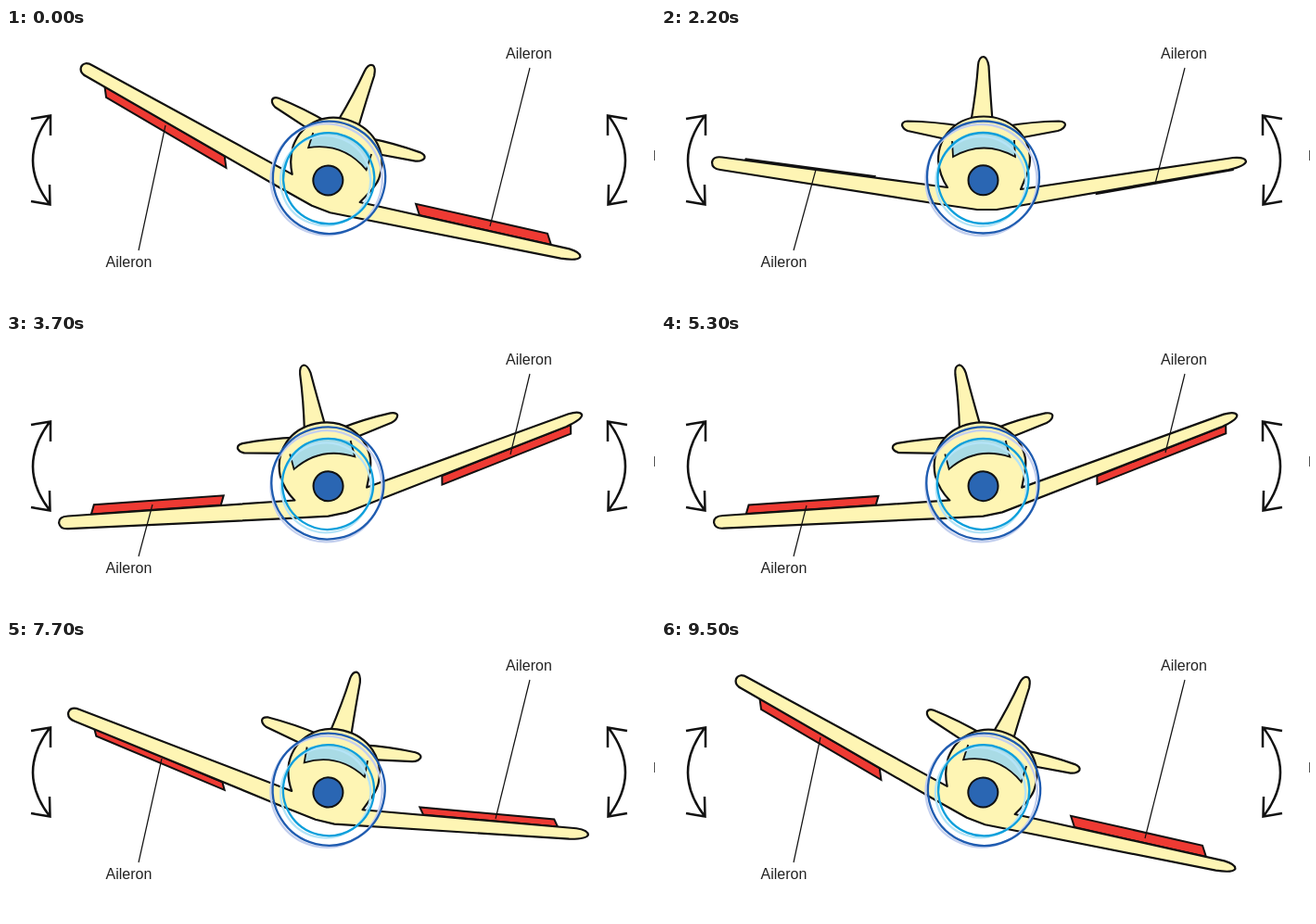
Recreate the animation shown at these times as an HTML page. Size 700 px wide and 300 px high, loop 9700 ms.

```html
<!DOCTYPE html>
<html lang="en">
<head>
<meta charset="utf-8">
<title>Ailerons and roll</title>
<style>
  html, body { margin: 0; width: 100%; height: 100%; overflow: hidden; background: #fff; }
  svg { display: block; width: 700px; height: 300px; }
  text { font: 16px Arial, "Liberation Sans", sans-serif; fill: #222; }
  .body { fill: #fef5b4; stroke: #111; stroke-width: 2.2; stroke-linejoin: round; }
  .flap { fill: #ee3a33; stroke: #111; stroke-width: 2; }
  .line { fill: none; stroke: #111; stroke-width: 1.2; }
  .arrow { fill: none; stroke: #111; stroke-width: 2.5; }
  .ring { fill: none; stroke-width: 2.3; }
</style>
</head>
<body>
<svg viewBox="0 0 700 300">
  <defs>
    <path id="arrow" class="arrow" d="M47 95Q11 143 47 190M27 98L48 94.5L48 116M27 187L47.5 190.5L47 169"/>
  </defs>
  <use href="#arrow"/>
  <use href="#arrow" transform="translate(697 0) scale(-1 1)"/>
  <rect x="699" y="132" width="1" height="11" fill="#555"/>

  <g id="plane">
    <path class="body" d="M334.5 100Q340 68 342 40Q343 31 348 31Q352 32 353.5 41Q355 68 357.5 100Z"/>
    <path class="body" d="M325 106Q295 101 266 100.5Q260 101 260 105Q261 109 266 111L312 121Z"/>
    <path class="body" d="M372 106Q400 101 429 100.5Q436 101 436 104.5Q435 109 428 111L380 120Z"/>
    <polygon id="flapL" class="flap"/>
    <polygon id="flapR" class="flap"/>
    <path class="body" d="M309 172L66 139.5Q56 138 55 145Q55 152 64 153L300 190L341 196H362L612 153Q630 149 631 144Q630 139 617 140L388 174C394 160 398 151 398 143C398 115 376 95.5 348 95.5C320 95.5 299 115 299 143C300 155 303 163 309 172Z"/>
    <path d="M314 123Q347 102 381 122L382 139Q348 120 315 139Z" fill="#a9dbe5"/>
    <path d="M314 122L315 139Q348 120 382 139L381 121" fill="none" stroke="#111" stroke-width="1.8"/>
    <circle class="ring" cx="345.5" cy="164" r="60" stroke="#c3cfee"/>
    <circle class="ring" cx="345" cy="165.5" r="48.5" stroke="#b5e4f7" stroke-width="3"/>
    <circle class="ring" cx="347.5" cy="161" r="60.5" stroke="#1f5cb0"/>
    <circle class="ring" cx="347.5" cy="162" r="49" stroke="#0d9fdb"/>
    <circle cx="347.5" cy="164.3" r="16" fill="#2a66b3" stroke="#111" stroke-width="2"/>
  </g>

  <line id="leadL" class="line" x1="143" y1="240"/>
  <line id="leadR" class="line" x1="565" y1="43"/>
  <text x="107.5" y="258">Aileron</text>
  <text x="539" y="33">Aileron</text>
</svg>
<script>
const LOOP = 9700, STEP = 100;
// time, roll in degrees, aileron deflection, left pointer x y, right pointer x y
const KEYS = [
  [0, 21, 1, 172, 105, 522, 214],
  [2200, 0, -0.1, 167, 153, 533, 168],
  [3700, -11.6, -0.9, 158, 184, 544, 130],
  [4500, -13.5, -1, 157, 190, 545, 124],
  [4600, -13.5, -1, 157, 190, 545, 124],
  [5300, -11.5, -0.83, 157, 185, 544, 128],
  [6600, 0.1, 0, 163, 154, 535, 166],
  [7700, 13.4, 0.7, 168, 128, 528, 193],
  [9500, 21, 1, 172, 105, 522, 214]
];
const $ = id => document.getElementById(id);

function secant(i, c) {
  const a = KEYS[i], b = KEYS[i + 1];
  return a && b ? (b[c] - a[c]) / (b[0] - a[0]) : 0;
}

function slope(i, c) {
  const p = secant(i - 1, c), q = secant(i, c);
  return p * q > 0 ? 2 * p * q / (p + q) : 0;
}

// Monotone cubic through the keys
function valueAt(t, c) {
  const last = KEYS.length - 1;
  if (t >= KEYS[last][0]) return KEYS[last][c];
  const i = KEYS.findIndex(k => k[0] > t) - 1;
  const a = KEYS[i], b = KEYS[i + 1], h = b[0] - a[0], u = (t - a[0]) / h, v = 1 - u;
  return a[c] * v * v * (1 + 2 * u) + b[c] * u * u * (1 + 2 * v)
    + h * u * v * (slope(i, c) * v - slope(i + 1, c) * u);
}

function setFlap(id, [x1, y1, x2, y2], dx, dy, amount) {
  const el = $(id), x = dx * amount, y = dy * amount;
  el.setAttribute("points", [x1, y1, x2, y2, x2 + x, y2 + y, x1 + x, y1 + y].join(" "));
  el.style.display = amount < 0.04 ? "none" : "";
}

function setLead(id, x, y) {
  $(id).setAttribute("x2", x);
  $(id).setAttribute("y2", y);
}

function draw(t) {
  const [roll, flap, lx, ly, rx, ry] = [1, 2, 3, 4, 5, 6].map(c => valueAt(t, c));
  $("plane").setAttribute("transform", `rotate(${roll} 347 164)`);
  if (flap > 0) {
    setFlap("flapL", [86, 155.5, 234, 180], 6, 11, flap);
    setFlap("flapR", [453, 164, 597, 143], -8, -10, flap);
  } else {
    setFlap("flapL", [91, 142.5, 230, 161], 5.5, -10.5, -flap);
    setFlap("flapR", [470, 178, 617, 152], -2, 10.5, -flap);
  }
  setLead("leadL", lx, ly);
  setLead("leadR", rx, ry);
}

const start = performance.now();
function tick(now) {
  const t = Math.max(0, now - start) % LOOP;
  draw(Math.floor(t / STEP) * STEP);
  requestAnimationFrame(tick);
}
draw(0);
requestAnimationFrame(tick);
</script>
</body>
</html>
```
